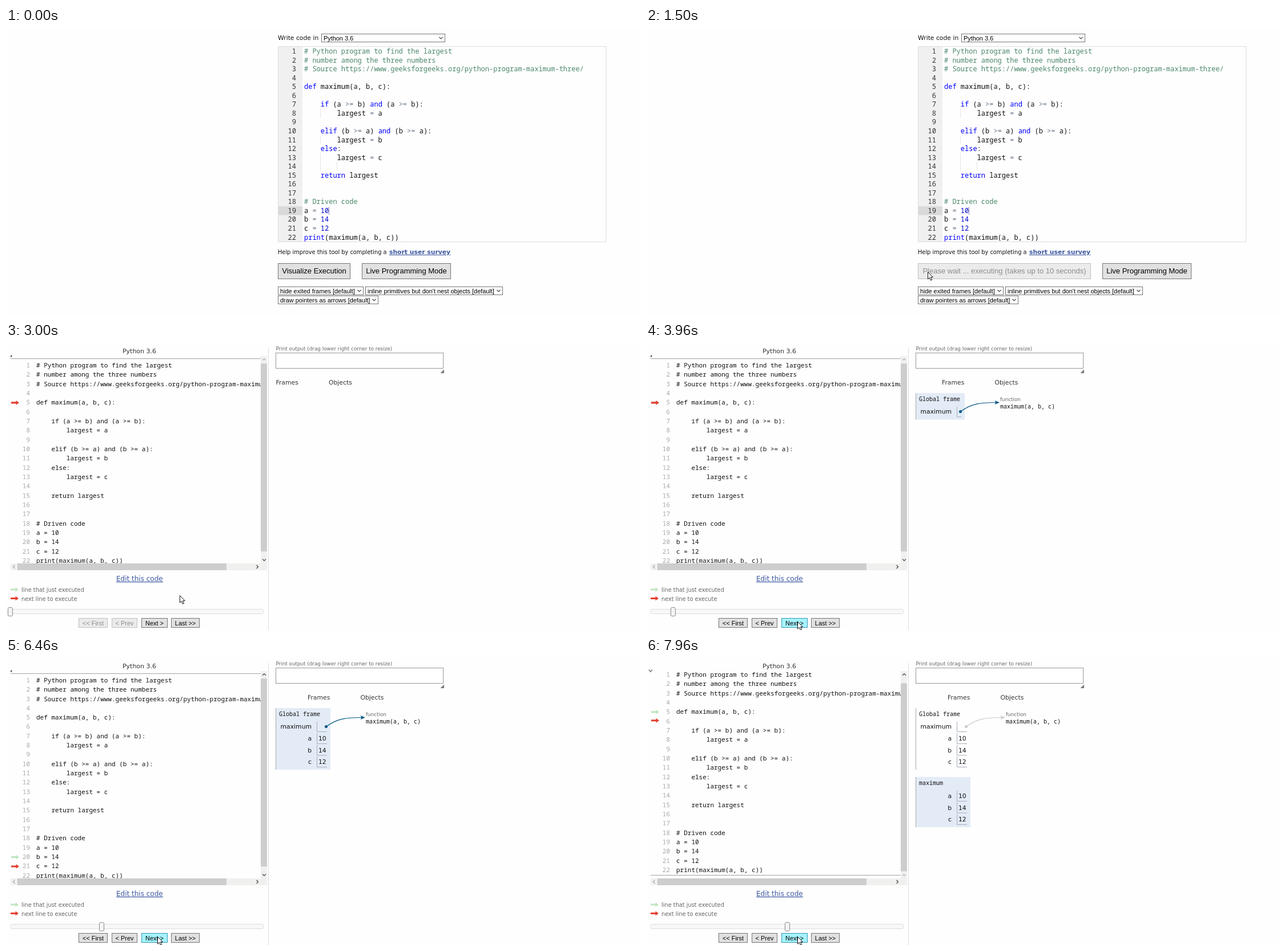
An HTML page that plays this animation: 1110 by 504 pixels, repeating every 8000 ms.

```html
<!DOCTYPE html>
<html lang="en">
<head>
<meta charset="utf-8">
<title>Stepping through a Python program</title>
<style>
html, body { margin: 0; width: 100%; height: 100%; overflow: hidden; background: #fefefe; }
svg { display: block; width: 1110px; height: 504px; }
text { white-space: pre; font-family: "DejaVu Sans", sans-serif; font-size: 10.8px; fill: #111; }
.mono { font-family: "Noto Sans Mono", monospace; font-size: 12px; }
.small { font-size: 11px; }
.tiny { font-size: 10px; }
.ui { font-family: "Liberation Sans", sans-serif; font-size: 10.9px; fill: #000; }
.big { font-size: 13px; }
.mid { text-anchor: middle; }
.end { text-anchor: end; }
.num { fill: #a8a8a8; }
.link { fill: #3d58a2; text-decoration: underline; }
.note { fill: #666; font-size: 9.8px; }
.hint { fill: #666; font-size: 8.8px; }
.head { fill: #333; }
.com { fill: #4c886b; } .key { fill: #0000ff; } .op { fill: #687687; } .lit { fill: #0000cd; }
.btn rect { fill: #e1e1e1; stroke: #767676; }
.btn.hot rect { fill: #a5f3fd; stroke: #3797b5; }
.btn.down rect { fill: #8fe4f1; stroke: #2a7f9a; }
.btn.off rect { fill: #ebebeb; stroke: #c0c0c0; }
.btn.off text { fill: #8c8c8c; }
.chev { fill: none; stroke: #444; stroke-width: 1.2; }
.cell { fill: none; stroke: #a5aeb9; }
.red { fill: #e53f32; } .green { fill: #c1e5c3; }
.wire { --c: #005583; }
.wire.dim { --c: #cccccc; }
.wire path { fill: none; stroke: var(--c); stroke-width: 1.2; }
.wire circle, .wire polygon { fill: var(--c); }
.active { fill: #e2ebf6; }
</style>
</head>
<body>
<svg id="stage" viewBox="0 0 1110 504"></svg>
<script>
const source = `# Python program to find the largest
# number among the three numbers
# Source https://www.geeksforgeeks.org/python-program-maximum-three/

def maximum(a, b, c):

    if (a >= b) and (a >= b):
        largest = a

    elif (b >= a) and (b >= a):
        largest = b
    else:
        largest = c

    return largest


# Driven code
a = 10
b = 14
c = 12
print(maximum(a, b, c))`.split("\n");

const esc = s => s.replace(/&/g, "&amp;").replace(/</g, "&lt;").replace(/>/g, "&gt;");
const text = (x, y, s, cls = "", extra = "") => `<text x="${x}" y="${y}" class="${cls}" ${extra}>${esc(s)}</text>`;
const rect = (x, y, w, h, fill, extra = "") => `<rect x="${x}" y="${y}" width="${w}" height="${h}" fill="${fill}" ${extra}/>`;
const line = (d, color) => `<path d="${d}" fill="none" stroke="${color}"/>`;
const chevron = (x, y, turn = 0, color = "#444") =>
  `<path class="chev" d="M-3 -1.5L0 1.5L3 -1.5" transform="translate(${x} ${y}) rotate(${turn})" style="stroke:${color}"/>`;
const button = (id, x, y, w, h, s, base, cls = "") =>
  `<g id="${id}" class="btn">${rect(x, y, w, h, "none")}${text(x + w / 2, base, s, "ui mid " + cls)}</g>`;
const select = (x, y, w, s) =>
  rect(x, y, w, 14, "#fff", 'stroke="#767676"') + text(x + 3.5, y + 11, s, "ui") + chevron(x + w - 7, y + 7);
const pointer = (id, cls, x = 0, y = 0) =>
  `<g id="${id}" class="${cls}" transform="translate(${x} ${y})"><polygon transform="scale(.78)" points="0,-2 11,-2 11,-5 18,0 11,5 11,2 0,2"/></g>`;

function highlight(s) {
  if (s[0] === "#") return `<tspan class="com">${s}</tspan>`;
  return s.replace(/\b(def|if|elif|else|and|return|print)\b|>=|=|\d+/g, (m, word) => {
    const cls = word ? "key" : /\d/.test(m) ? "lit" : "op";
    return `<tspan class="${cls}">${esc(m)}</tspan>`;
  });
}

function editor() {
  const rowY = n => 41 + (n - 1) * 15.55;
  let out = rect(477, 33, 42, 342, "#f0f0f0") + rect(477, 313, 42, 15.5, "#dadada");
  source.forEach((s, i) => {
    const y = rowY(i + 1) + 4;
    out += text(508, y, String(i + 1), "mono end head") +
      `<text x="522" y="${y}" class="mono">${highlight(s)}</text>`;
  });
  for (const [n, x] of [[8, 550.5], [11, 550.5], [13, 550.5], [14, 550.5], [14, 579.5]])
    out += line(`M${x} ${rowY(n) - 8}v15.5`, "#e4e4e4");
  return out + line("M565.5 314v14", "#8a8ab0") + rect(476.5, 32.5, 574, 343, "none", 'stroke="#ddd"');
}

const editView = `<g id="edit">
  ${text(476, 21, "Write code in")}${select(552.5, 10.5, 216, "Python 3.6")}
  ${editor()}
  ${text(476, 397, "Help improve this tool by completing a", "", 'style="font-size:9.8px"')}
  ${text(671, 397, "short user survey", "link", 'font-weight="bold"')}
  ${button("run", 476.5, 413.5, 126, 27, "Visualize Execution", 431, "big")}
  ${button("wait", 476.5, 413.5, 302, 27, "Please wait ... executing (takes up to 10 seconds)", 431, "big")}
  ${button("live", 623.5, 413.5, 155, 27, "Live Programming Mode", 431, "big")}
  ${select(476.5, 454.5, 149, "hide exited frames [default]")}
  ${select(629.5, 454.5, 240, "inline primitives but don't nest objects [default]")}
  ${select(476.5, 470.5, 175, "draw pointers as arrows [default]")}
</g>`;

const lineY = n => 39 + (n - 1) * 16.33;
const listing = source.map((s, i) =>
  text(42, lineY(i + 1) + 4, String(i + 1), "mono small end num") +
  text(53, lineY(i + 1) + 4, s, "mono small")).join("");

const variable = (id, y, name, value) => `<g id="${id}">
  ${text(535, y + 4, name, "end")}${text(547, y + 4, value)}
  <path class="cell" d="M544.5 ${y - 9}V${y + 9.5}H562"/></g>`;

const runView = `<g id="trace">
  ${text(233.5, 17.5, "Python 3.6", "mid head small")}
  <path id="mark" fill="none" stroke-width="1.8"/>
  <clipPath id="pane"><rect x="0" y="23" width="446" height="364"/></clipPath>
  <g clip-path="url(#pane)"><g id="code">
    ${line("M8 27.5H446M8 391.5H446", "#a0a0a0")}${listing}
    ${pointer("prev", "green")}${pointer("next", "red")}
  </g></g>
  ${rect(446, 23, 11, 364, "#f0f0f0")}${rect(446, 36, 11, 330, "#cdcdcd", 'id="thumb"')}
  <g id="up">${chevron(452, 29, 180)}</g><g id="low">${chevron(452, 381)}</g>
  ${rect(8, 387, 449, 12, "#f0f0ee")}${rect(20, 387, 366, 12, "#cdcdcd")}
  ${chevron(14, 393, 90, "#aaa")}${chevron(440, 393, -90)}
  ${text(193, 418, "Edit this code", "link", 'style="font-size:12px"')}
  ${pointer("keyA", "green", 8, 433)}${text(27, 437, "line that just executed", "note")}
  ${pointer("keyB", "red", 8, 448.5)}${text(27, 452.5, "next line to execute", "note")}
  ${rect(8.5, 467.5, 442, 8, "#f8f8f8", 'stroke="#ddd" rx="2"')}
  ${rect(3.5, 464.5, 8, 15, "#f4f4f4", 'stroke="#888" rx="2" id="knob"')}
  ${button("first", 127.5, 483.5, 50, 16, "<< First", 495.5)}
  ${button("back", 185.5, 483.5, 44, 16, "< Prev", 495.5)}
  ${button("step", 237.5, 483.5, 45, 16, "Next >", 495.5)}
  ${button("last", 289.5, 483.5, 49, 16, "Last >>", 495.5)}
  ${line("M459.5 9V504", "#ddd")}
  ${text(472.5, 13, "Print output (drag lower right corner to resize)", "hint")}
  ${rect(472.5, 17.5, 293, 27, "#fff", 'stroke="#999"')}
  <path d="M767 46.5V53H760.5Z" fill="#777"/>
  <g id="heads">${text(528, 73, "Frames", "head")}${text(620.5, 73, "Objects", "head")}</g>
  <g id="globals">
    ${rect(472, 88, 96, 108, "none", 'id="box"')}
    <path id="edge" stroke="#aaa"/>
    ${text(478, 102, "Global frame", "mono tiny")}
    ${text(535, 124, "maximum", "end")}<path id="slot" class="cell"/>
    ${variable("ga", 141, "a", "10")}${variable("gb", 161.5, "b", "14")}${variable("gc", 182, "c", "12")}
    <g id="heap">
      ${text(630, 101.5, "function", "hint")}${text(630, 115, "maximum(a, b, c)", "mono tiny")}
      <g id="wire" class="wire"><circle cx="560.5" cy="120.5" r="2.5"/>
        <path d="M560.5 120.5C580 106 596 104.5 624 104.5"/>
        <polygon points="629,104.5 620.5,101 622.5,104.5 620.5,108"/></g>
    </g>
  </g>
  <g id="call">
    ${rect(472, 209, 96, 88, "none", 'class="active"')}${line("M472.5 209V297", "#aaa")}
    ${text(478, 223, "maximum", "mono tiny")}
    ${variable("ca", 242, "a", "10")}${variable("cb", 262.5, "b", "14")}${variable("cc", 283, "c", "12")}
  </g>
</g>`;

document.getElementById("stage").innerHTML = editView + runView +
  `<path id="mouse" d="M.5 .5V13L3.4 10.4L5.4 15.2L7.6 14.2L5.6 9.6H9.4Z" fill="#fff" stroke="#111" stroke-width="1"/>`;

const el = {};
document.querySelectorAll("[id]").forEach(n => el[n.id] = n);

const LOOP = 8000, SWITCH = 1730;
const updates = [3960, 4900, 5900, 6460, 7060, 7670];
const presses = [3800, 4730, 5730, 6290, 6890, 7500];
const lines = [5, 19, 20, 21, 22, 5, 7];
const path = [
  [400, 1019, 494], [520, 870, 476], [660, 665, 453], [780, 540, 437], [900, 493, 428],
  [2600, 493, 428], [2700, 455, 425], [2800, 395, 427], [2900, 340, 434], [3000, 304, 443],
  [3200, 282, 463], [3400, 268, 483], [3500, 265, 489]
];

const clamp = v => Math.min(1, Math.max(0, v));
const mix = (a, b, p) => a + (b - a) * p;
const cubic = p => p < .5 ? 4 * p ** 3 : 1 - 4 * (1 - p) ** 3;
const show = (node, on) => { node.style.display = on ? "" : "none"; };
const move = (node, x, y) => node.setAttribute("transform", `translate(${x} ${y})`);
const look = (node, cls) => node.setAttribute("class", "btn " + cls);

function mouseAt(t) {
  const i = path.findIndex(k => k[0] > t);
  if (i < 0) return path[path.length - 1].slice(1);
  if (!i) return path[0].slice(1);
  const a = path[i - 1], b = path[i], p = (t - a[0]) / (b[0] - a[0]);
  return [mix(a[1], b[1], p), mix(a[2], b[2], p)];
}

function drawEdit(t, x, y) {
  const waiting = t >= 1420;
  show(el.run, !waiting);
  show(el.wait, waiting);
  look(el.wait, "off");
  look(el.run, t >= 1360 ? "down" : t >= 400 && x < 603 && y < 441 ? "hot" : "");
  move(el.live, waiting ? 176 : 0, 0);
}

function drawTrace(t) {
  const step = updates.filter(u => t >= u).length;
  const slide = step ? cubic(clamp((t - updates[step - 1] - 160) / 270)) : 0;
  const scroll = 10 * clamp((t - 6460) / 70);

  move(el.code, 0, -scroll);
  el.thumb.setAttribute("y", 36 + .85 * scroll);
  el.up.style.opacity = scroll ? 1 : .35;
  el.low.style.opacity = scroll < 10 ? 1 : .35;
  el.mark.setAttribute("d", t < 1760 || t >= 6500 ? "M5 20.5L8 24L11 20.5" : "M8.5 24.5L10 21.5");
  el.mark.setAttribute("stroke", t < 6500 ? "#444" : "#888");

  const from = lines[Math.max(0, step - 1)];
  const done = slide > 0 ? from : lines[Math.max(0, step - 2)];
  move(el.next, 9, mix(lineY(from), lineY(lines[step]), slide) + .5);
  move(el.prev, 9, lineY(done) + .5);
  show(el.prev, step > 0);

  move(el.knob, 40 * step, 0);
  look(el.first, step ? "" : "off");
  look(el.back, step ? "" : "off");
  const held = presses.some((p, i) => t >= p && t < updates[i]);
  look(el.step, held ? "down" : t >= 3430 ? "hot" : "");

  const dx = step === 1 ? -10 : 0;
  const bottom = 134.5 + 20.5 * Math.min(3, Math.max(0, step - 1));
  move(el.heads, step ? dx : -55.5, 0);
  show(el.globals, step > 0);
  show(el.call, step > 4);
  [el.ga, el.gb, el.gc].forEach((n, i) => show(n, step > i + 1));
  el.box.setAttribute("width", 96 + dx);
  el.box.setAttribute("height", bottom - 88);
  el.box.setAttribute("class", step < 5 ? "active" : "");
  el.edge.setAttribute("d", `M472.5 88V${bottom}`);
  el.slot.setAttribute("d", `M544.5 112V129.5H${562 + dx}`);
  move(el.heap, dx, 0);
  el.wire.setAttribute("class", step < 5 ? "wire" : "wire dim");
}

function draw(t) {
  const [x, y] = mouseAt(t), editing = t < SWITCH;
  show(el.edit, editing);
  show(el.trace, !editing);
  show(el.mouse, t >= 400);
  move(el.mouse, x, y);
  if (editing) drawEdit(t, x, y);
  else drawTrace(t);
}

const start = performance.now();
function tick() {
  draw((performance.now() - start) % LOOP);
  requestAnimationFrame(tick);
}
tick();
</script>
</body>
</html>
```
